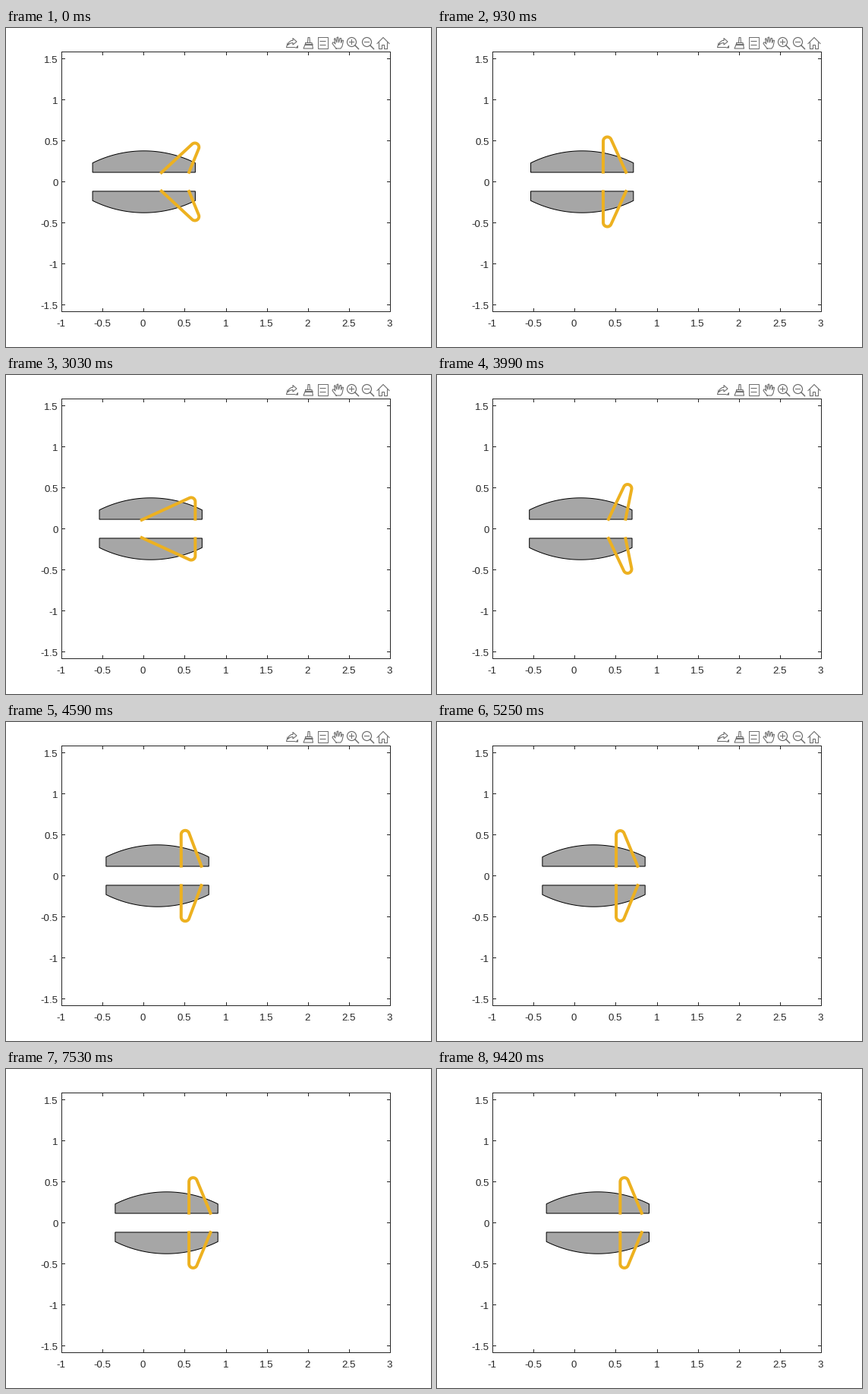
Animation, 560 px wide and 420 px high, one loop 9480 ms. Source, as a matplotlib script:

```python
import numpy as np
import matplotlib.pyplot as plt
from matplotlib.animation import FuncAnimation
from matplotlib.patches import Circle, Polygon

W, H, DPI = 560, 420, 100
STEP, FRAMES = 30, 316
PX = 72 / DPI                                   # points per pixel
LEFT, RIGHT, TOP, BOTTOM = 73.5, 506.5, 31.5, 373.5
UNIT = (RIGHT - LEFT) / 4
X0, Y0 = LEFT + UNIT, (TOP + BOTTOM) / 2
INK, GREY, GOLD = "#262626", "#6e6e6e", "#edb120"

PERIOD, STOP = 3720, 4620                       # stroke cycle, end of actuation
TOOLBAR_END = 7200

# Body: half length, flat inner side, end height, apex height
HALF, FLAT, EDGE, APEX = 0.625, 0.115, 0.229, 0.376

# Arm: a belt of fixed length from a slider over a tip roller to an anchor
FOOT, ROLLER, BELT, ANCHOR = 0.1, 0.05, 0.988, 0.542

# Key poses of one cycle: time, slider, tip (relative to the body centre)
POSES = np.array([
    (0, 0.20, 0.62), (270, 0.33, 0.57), (900, 0.273, 0.323),
    (1370, -0.02, 0.06), (1830, -0.215, -0.10), (2450, -0.29, 0.125),
    (3030, -0.127, 0.492)])


def harmonics(t):
    """Constant, cosine and sine terms of the cycle up to third order."""
    w = 2 * np.pi * np.asarray(t)[..., None] / PERIOD * np.arange(1, 4)
    return np.concatenate([np.ones(w.shape[:-1] + (1,)), np.cos(w), np.sin(w)], -1)


CYCLE = np.linalg.solve(harmonics(POSES[:, 0]), POSES[:, 1:])


def swim(t):
    """Back-and-forth surge plus a growing advance, in pixels."""
    n = t / PERIOD
    return 9.25 * (1 - np.cos(2 * np.pi * n)) + 5.6 * n ** 2.5


def body_shift(t):
    px = swim(min(t, STOP))
    if t > STOP:                                # coast to rest
        px += (30.1 - px) * (1 - np.exp((STOP - t) / 800))
    return px / UNIT


def belt(slider, tip, rise):
    """Belt length for a roller at this height, and its wrap angles."""
    total, angles = 0, []
    for foot, side in ((slider, 1), (ANCHOR, -1)):
        dx = tip - foot
        dist = np.hypot(dx, rise)
        total += np.sqrt(dist ** 2 - ROLLER ** 2)
        lean = np.arctan2(rise, dx) + side * np.arcsin(ROLLER / dist)
        angles.append(lean + side * np.pi / 2)
    return total + ROLLER * (angles[0] - angles[1]), angles


def arm(t):
    """Arm outline relative to the body centre; the belt keeps its length."""
    slider, tip = harmonics(min(t, STOP)) @ CYCLE
    lo, hi = 0.06, 0.6
    for _ in range(30):
        mid = (lo + hi) / 2
        if belt(slider, tip, mid)[0] < BELT:
            lo = mid
        else:
            hi = mid
    a = np.linspace(*belt(slider, tip, lo)[1], 24)
    x = np.r_[slider, tip + ROLLER * np.cos(a), ANCHOR]
    y = np.r_[FOOT, FOOT + lo + ROLLER * np.sin(a), FOOT]
    return x, y


def shell():
    """Flat-bottomed half body with a circular top."""
    sag = APEX - EDGE
    rad = (HALF ** 2 + sag ** 2) / (2 * sag)
    x = np.linspace(-HALF, HALF, 60)
    y = APEX - rad + np.sqrt(rad ** 2 - x ** 2)
    return np.r_[-HALF, x, HALF], np.r_[FLAT, y, FLAT]


def to_px(x, y):
    return X0 + UNIT * np.asarray(x), Y0 - UNIT * np.asarray(y)


fig = plt.figure(figsize=(W / DPI, H / DPI), dpi=DPI, facecolor="white")
ax = fig.add_axes([0, 0, 1, 1])
ax.set(xlim=(0, W), ylim=(H, 0))
ax.axis("off")


def stroke(points, color=INK, width=1, **kw):
    x, y = zip(*points)
    return ax.plot(x, y, color=color, lw=width * PX, snap=False, **kw)[0]


def box(x0, y0, x1, y1, **kw):
    return stroke([(x0, y0), (x1, y0), (x1, y1), (x0, y1), (x0, y0)],
                  solid_joinstyle="miter", **kw)


def label(x, y, value, ha):
    ax.text(x, y, f"{value:g}", family="Liberation Sans", size=13.3 * PX,
            color=INK, ha=ha, va="baseline")


def draw_axes():
    box(LEFT, TOP, RIGHT, BOTTOM)
    for v in np.arange(-1, 3.1, 0.5):
        x = np.floor(X0 + UNIT * v) + 0.5
        for y, tick in ((BOTTOM, -4.5), (TOP, 4.5)):
            stroke([(x, y), (x, y + tick)], solid_capstyle="butt")
        label(x - 1, 393, v, "center")
    for v in np.arange(-1.5, 1.6, 0.5):
        y = np.floor(Y0 - UNIT * v) + 0.5
        for x, tick in ((LEFT, 4.5), (RIGHT, -4.5)):
            stroke([(x, y), (x + tick, y)], solid_capstyle="butt")
        label(68.5, y + 5.5, v, "right")


def draw_toolbar():
    parts = []

    def line(*points, width=1.1):
        parts.append(stroke(points, GREY, width))

    # export
    line((371, 20), (369.5, 25.5), (381, 25.5))
    line((371.5, 22), (373, 18.5), (376, 16.5), (378, 16.5), (378, 13.5),
         (383, 18), (378, 22), (378, 19.5), (375, 20), (371.5, 22))
    parts.append(ax.add_patch(Polygon([(381, 26.5), (385, 22.5), (385, 26.5)],
                                      fc=GREY, lw=0)))
    # brush
    line((397.5, 19), (398, 12.5), (400, 12.5), (400.5, 19))
    line((395, 19.5), (403, 19.5), (404.5, 27), (392, 27), (395, 19.5))
    line((395, 22), (403.5, 22), width=2)
    # data tip
    parts.append(box(411.5, 12.5, 424.5, 27.5, color=GREY))
    for y in (17.5, 22.5):
        line((414, y), (421, y))
    # hand
    line((435, 27), (430, 20.5), (430.5, 19), (432, 19), (434, 21),
         (432.5, 14.5), (433.5, 13.5), (436, 19), (436, 12.5), (437.5, 12),
         (438.5, 19), (440, 13.5), (441.5, 13.5), (441.5, 19.5),
         (443, 16), (444.5, 16.5), (443, 24), (441, 27), (435, 27))
    # zoom in, zoom out
    for x in (455.5, 475.5):
        parts.append(ax.add_patch(Circle((x, 18.5), 6, fill=False, ec=GREY,
                                         lw=1.2 * PX)))
        line((x + 4.3, 22.8), (x + 9, 27.5), width=1.5)
        line((x - 3, 18.5), (x + 3, 18.5))
    line((455.5, 15.5), (455.5, 21.5))
    # home
    line((489, 20.5), (497, 12.5), (505, 20.5))
    line((491.5, 19), (491.5, 27.5), (495.5, 27.5), (495.5, 22.5),
         (498.5, 22.5), (498.5, 27.5), (502.5, 27.5), (502.5, 19))
    return parts


draw_axes()
toolbar = draw_toolbar()
shell_x, shell_y = shell()
SIDES = (1, -1)
bodies = [ax.add_patch(Polygon([(0, 0)], closed=True, fc="#a6a6a6", ec="black",
                               lw=PX, zorder=3, snap=False)) for _ in SIDES]
arms = [stroke([(0, 0)], GOLD, 4, zorder=4, solid_capstyle="butt",
               solid_joinstyle="round") for _ in SIDES]


def update(i):
    t = min(i, FRAMES - 2) * STEP
    c = body_shift(t)
    x, y = arm(t)
    for side, body, limb in zip(SIDES, bodies, arms):
        body.set_xy(np.column_stack(to_px(shell_x + c, side * shell_y)))
        limb.set_data(*to_px(x + c, side * y))
    for part in toolbar:
        part.set_visible(t < TOOLBAR_END)
    return bodies + arms + toolbar


anim = FuncAnimation(fig, update, frames=FRAMES, interval=STEP, repeat=True,
                     repeat_delay=0, blit=False)
plt.show()
```
